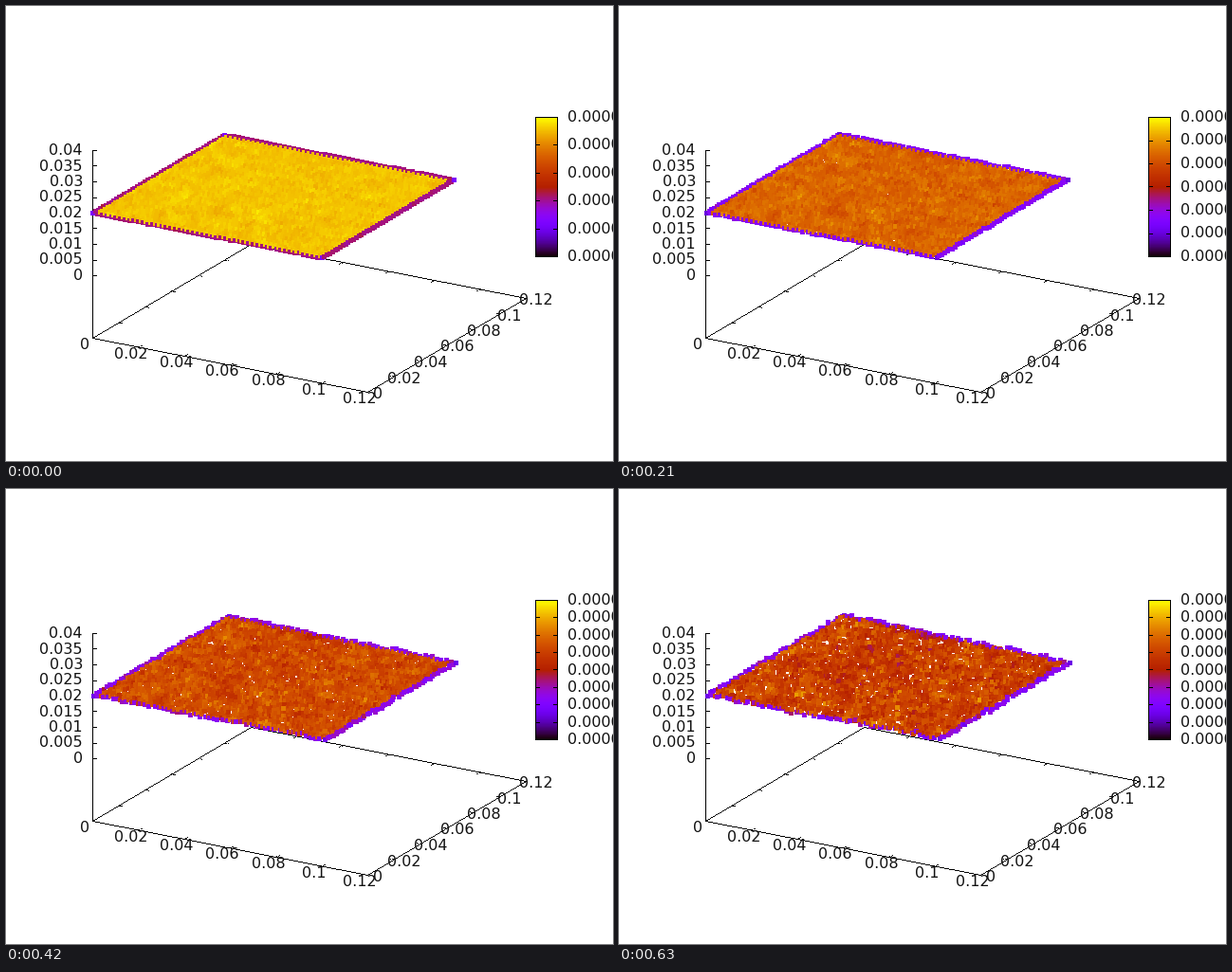
Recreate the animation shown at these times as a matplotlib script. Size 640 by 480 pixels, loop 0.7 s.

```python
import numpy as np
import matplotlib.pyplot as plt
from matplotlib.animation import FuncAnimation

W, H = 640, 480
FRAMES, STEP = 10, 70
N = 51                                   # particles along each side
ORIGIN = np.array([91.0, 350.0])
X_AXIS = np.array([290.0, 57.0])         # screen vectors for 0.12 units
Y_AXIS = np.array([167.0, -99.0])
Z_ZERO, Z_STEP = 284, 16.5
BAR = (558, 581, 117, 264)               # left, right, top, bottom

# per step: number of colour bar intervals, palette level inside and on the rim
INTERVALS = [5, 6, 6, 6, 7, 7, 8, 8, 8, 8]
INNER = [.915, .765, .755, .735, .665, .665, .665, .65, .635, .63]
RIM = [.42, .35, .32, .29, .26, .29, .33, .32, .31, .31]

cmap = plt.get_cmap("gnuplot")

fig = plt.figure(figsize=(W / 100, H / 100), dpi=100, facecolor="white")
ax = fig.add_axes([0, 0, 1, 1])


def line(img, p, q):
    """One pixel wide black line without smoothing."""
    p, q = np.asarray(p, float), np.asarray(q, float)
    n = int(np.abs(q - p).max().round()) + 1
    x, y = np.rint(np.linspace(p, q, n)).astype(int).T
    img[y, x] = 0


def label(x, y, s, ha="center"):
    return ax.text(x, y + 5, s, ha=ha, va="baseline", fontsize=11.52,
                   family="DejaVu Sans", color="#111111", zorder=3)


def draw_axes(img):
    far = ORIGIN + X_AXIS + Y_AXIS
    for p, q in [(ORIGIN, ORIGIN + X_AXIS), (ORIGIN + X_AXIS, far),
                 (far, ORIGIN + Y_AXIS), (ORIGIN + Y_AXIS, ORIGIN)]:
        line(img, p, q)
    line(img, ORIGIN, (ORIGIN[0], 152))
    dx, dy = X_AXIS * .012, Y_AXIS * .02
    for k in range(7):
        text = f"{.02 * k:.2g}"
        a, b = ORIGIN + X_AXIS * k / 6, ORIGIN + Y_AXIS * k / 6
        line(img, a, a + dy)
        line(img, a + Y_AXIS, a + Y_AXIS - dy)
        line(img, b, b + dx)
        line(img, b + X_AXIS, b + X_AXIS - dx)
        label(a[0] - 8, a[1] + 7, text)
        label(b[0] + X_AXIS[0] + 11, b[1] + X_AXIS[1] + 2, text)
    for k in range(9):
        y = Z_ZERO - Z_STEP * k
        line(img, (91, y), (95, y))
        label(81, y, f"{.005 * k:.3g}", "right")


def draw_bar(img):
    l, r, t, b = BAR
    img[t:b + 1, l:r + 1, :3] = cmap(np.linspace(1, 0, b - t + 1))[:, None, :3]
    for p, q in [((l, t), (r, t)), ((r, t), (r, b)),
                 ((r, b), (l, b)), ((l, b), (l, t))]:
        line(img, p, q)


def bar_ticks(n):
    return BAR[3] - (BAR[3] - BAR[2]) * np.arange(n + 1) / n


def smooth(f):
    for axis in (0, 1):
        f = f + .4 * (np.roll(f, 1, axis) + np.roll(f, -1, axis))
    return f / f.std()


rng = np.random.default_rng(7)
u, v = np.meshgrid(np.linspace(0, 1, N), np.linspace(0, 1, N), indexing="ij")
drift = rng.normal(size=(2, N, N))
noise_a, noise_b = (smooth(rng.normal(size=(N, N))) for _ in range(2))
grain = rng.normal(size=(N, N))
on_u, on_v = (u == 0) | (u == 1), (v == 0) | (v == 1)
rim, corner = on_u | on_v, on_u & on_v

# square marker, five pixels wide
DOT_Y, DOT_X = (d.ravel() for d in np.mgrid[-2:3, -2:3])


def draw_plate(img, i):
    s = i / (FRAMES - 1)
    side = 10 / 12
    x = ORIGIN[0] + side * (X_AXIS[0] * u + Y_AXIS[0] * v)
    y = 218 + side * (X_AXIS[1] * u + Y_AXIS[1] * v)
    # the sheet slowly shears while its particles scatter
    x = x + s * (2 + 3 * u + 4 * v - 6 * u * v)
    y = y - s * (1 + 1.5 * u + 2 * v - 4 * u * v)
    scatter = .1 + .9 * s
    x = x + scatter * drift[0]
    y = y + scatter * drift[1]

    spread = .015 + .05 * s
    field = noise_a * np.cos(1.6 * s) + noise_b * np.sin(1.6 * s)
    level = INNER[i] + spread * (.75 * field + .65 * grain)
    edge = RIM[i] + (.012 + .04 * s) * grain
    level = np.where(rim, edge, level)
    level = np.where(corner, RIM[i] * .58, level)

    px = np.rint(x).astype(int).ravel()[:, None] + DOT_X
    py = np.rint(y).astype(int).ravel()[:, None] + DOT_Y
    img[py, px] = cmap(np.clip(level, 0, 1))[..., :3].reshape(-1, 1, 3)


scene = np.ones((H, W, 3))
draw_axes(scene)
draw_bar(scene)
bar_labels = {n: [label(592, y, f"0.0000{k}", "left")
                  for k, y in enumerate(bar_ticks(n))]
              for n in sorted(set(INTERVALS))}
picture = ax.imshow(scene, extent=(0, W, H, 0), interpolation="nearest")
ax.set(xlim=(0, W), ylim=(H, 0), aspect="auto")
ax.axis("off")


def update(i):
    img = scene.copy()
    l, r = BAR[:2]
    for y in bar_ticks(INTERVALS[i]):
        line(img, (l, y), (l + 4, y))
        line(img, (r - 4, y), (r, y))
    draw_plate(img, i)
    picture.set_data(img)
    for n, texts in bar_labels.items():
        for t in texts:
            t.set_visible(n == INTERVALS[i])
    return [picture]


update(0)
anim = FuncAnimation(fig, update, frames=FRAMES, interval=STEP,
                     repeat=True, repeat_delay=0, blit=False)
plt.show()
```
